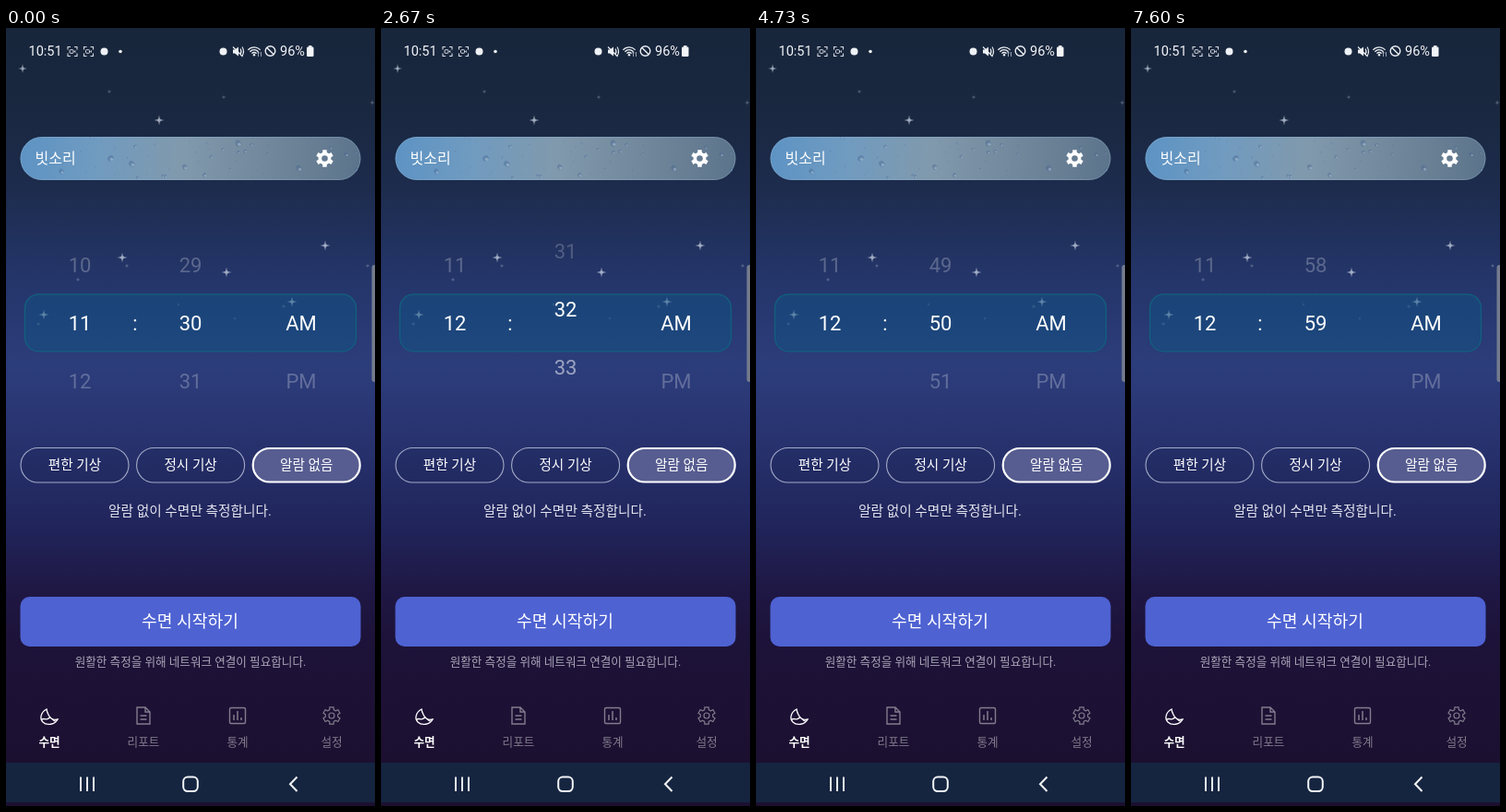
Animation of 400 by 844 pixels, one loop 8 s. Source, as an HTML page with a canvas:

```html
<!DOCTYPE html>
<html lang="ko">
<head>
<meta charset="utf-8">
<title>Alarm picker</title>
<style>
html, body { margin: 0; width: 100%; height: 100%; overflow: hidden; background: #1c1030; }
canvas { display: block; width: 400px; height: 844px; }
</style>
</head>
<body>
<canvas id="stage" width="400" height="844"></canvas>
<script>
const ctx = document.getElementById('stage').getContext('2d');
const LOOP = 8000, STEP = 1000 / 15, ROW = 63, MID = 320;
const FONT = 'Roboto, "Noto Sans CJK KR", "Noto Sans CJK", sans-serif';

const HOUR_KEYS = [[0.33, 11], [0.7, 11.3], [1.05, 11.82], [1.4, 12]];
const MINUTE_KEYS = [[2.07, 30], [2.7, 32.4], [3.4, 36.73], [4.2, 47.6], [4.73, 49.98],
  [5.05, 50.7], [5.6, 53.83], [6.3, 57.6], [6.87, 58.8], [7.6, 59]];

// monotone cubic through [time, value] keys
function track(keys, t) {
  const n = keys.length - 1;
  if (t <= keys[0][0]) return keys[0][1];
  if (t >= keys[n][0]) return keys[n][1];
  let i = 0;
  while (t > keys[i + 1][0]) i++;
  const rise = k => (keys[k + 1][1] - keys[k][1]) / (keys[k + 1][0] - keys[k][0]);
  const slope = k => {
    if (k === 0 || k === n) return 0;
    const a = rise(k - 1), b = rise(k);
    return a * b > 0 ? 2 * a * b / (a + b) : 0;
  };
  const h = keys[i + 1][0] - keys[i][0], u = (t - keys[i][0]) / h, v = 1 - u;
  return keys[i][1] * (1 + 2 * u) * v * v + keys[i + 1][1] * u * u * (3 - 2 * u) +
    h * (slope(i) * u * v * v - slope(i + 1) * u * u * v);
}

function vertical(y0, y1, stops) {
  const g = ctx.createLinearGradient(0, y0, 0, y1);
  for (const [p, c] of stops) g.addColorStop(p, c);
  return g;
}

function box(x, y, w, h, r, fill, stroke, width = 1) {
  ctx.beginPath();
  ctx.roundRect(x, y, w, h, r);
  paint(fill, stroke, width);
}

function paint(fill, stroke, width = 1) {
  if (fill) { ctx.fillStyle = fill; ctx.fill(); }
  if (stroke) { ctx.strokeStyle = stroke; ctx.lineWidth = width; ctx.stroke(); }
}

function path(d, fill, stroke, width, x = 0, y = 0) {
  ctx.save();
  ctx.translate(x, y);
  const p = new Path2D(d);
  if (fill) { ctx.fillStyle = fill; ctx.fill(p, 'evenodd'); }
  if (stroke) { ctx.strokeStyle = stroke; ctx.lineWidth = width; ctx.stroke(p); }
  ctx.restore();
}

function disc(x, y, r, fill, stroke, width) {
  ctx.beginPath();
  ctx.arc(x, y, r, 0, 7);
  paint(fill, stroke, width);
}

function text(s, x, y, size, color = '#fff', weight = 400, align = 'center') {
  ctx.font = `${weight} ${size}px ${FONT}`;
  ctx.textAlign = align;
  ctx.fillStyle = color;
  ctx.fillText(s, x, y);
}

function gear(x, y, outer, inner, hole, fill, stroke) {
  ctx.beginPath();
  for (let k = 0; k < 6; k++) {
    const a = k * Math.PI / 3 - Math.PI / 2;
    for (const [da, r] of [[-0.34, inner], [-0.23, outer], [0.23, outer], [0.34, inner]])
      ctx.lineTo(x + r * Math.cos(a + da), y + r * Math.sin(a + da));
  }
  ctx.closePath();
  ctx.moveTo(x + hole, y);
  ctx.arc(x, y, hole, 0, 2 * Math.PI);
  if (fill) { ctx.fillStyle = fill; ctx.fill('evenodd'); }
  if (stroke) { ctx.strokeStyle = stroke; ctx.lineWidth = 1.2; ctx.stroke(); }
}

const STARS = [[18, 44, 5], [112, 69, 2.5], [166, 100, 5.5], [236, 75, 2.5], [397, 81, 3],
  [126, 249, 5.5], [131, 258, 2.5], [78, 273, 2.5], [239, 265, 5.5], [346, 236, 5.5],
  [392, 258, 2.5], [187, 300, 2], [41, 311, 5.5], [35, 321, 2.5], [310, 297, 5.5],
  [301, 302, 2.5], [248, 315, 2]];

function star(x, y, r) {
  const q = r * 0.17;
  ctx.beginPath();
  for (let k = 0; k < 8; k++) {
    const d = k % 2 ? q * 1.4 : r, a = k * Math.PI / 4;
    ctx.lineTo(x + d * Math.cos(a), y + d * Math.sin(a));
  }
  paint(`rgba(205,212,225,${r > 4 ? 0.68 : 0.42})`);
  if (r > 4) disc(x, y, r * 0.42, 'rgba(200,210,230,.25)');
}

function background() {
  ctx.fillStyle = vertical(0, 797, [[0, '#18263c'], [0.1, '#19273f'], [0.22, '#1d2c4d'],
    [0.34, '#24356a'], [0.46, '#2c3d7b'], [0.51, '#2b3876'], [0.6, '#252e68'],
    [0.68, '#20245a'], [0.76, '#1f1845'], [0.84, '#1d1238'], [1, '#1c1031']]);
  ctx.fillRect(0, 0, 400, 844);
  ctx.fillStyle = '#152540';
  ctx.fillRect(0, 797, 400, 43);
  ctx.fillStyle = '#1c1030';
  ctx.fillRect(0, 840, 400, 4);
  for (const s of STARS) star(...s);
}

function recorder(x, lit) {
  path('M-5-2V-5H-2M2-5H5V-2M5 2V5H2M-2 5H-5V2', null, '#d5dae2', 1.1, x, 25.5);
  if (!lit) return;
  box(x - 3, 23.7, 4, 3.6, 0.8, null, '#d5dae2', 1);
  path('M1.5 0L3.3-1.6V1.6Z', '#d5dae2', null, 0, x, 25.5);
}

function statusBar(t) {
  text('10:51', 24.5, 30, 14.5, '#f2f4f7', 400, 'left');
  recorder(72, t < 3.2 || t > 3.53);
  recorder(89.5, true);
  disc(106.5, 25.5, 4, '#eef1f5');
  disc(124, 25.5, 1.8, '#eef1f5');

  disc(235.5, 25.5, 4, '#eef1f5');
  path('M-5-2H-3L1-5V5L-3 2H-5Z', '#eef1f5', null, 0, 251, 25.5);
  path('M-5-5L5.5 5.5M3-3Q5 0 3 3M5-5Q8 0 5 5', null, '#eef1f5', 1.1, 251, 25.5);
  for (const r of [3.5, 6.3, 9.1]) {
    ctx.beginPath();
    ctx.arc(269, 30, r, -Math.PI * 0.76, -Math.PI * 0.24);
    paint(null, '#eef1f5', 1.3);
  }
  disc(269, 29.3, 1.2, '#eef1f5');
  path('M0-2V3M-1.5-.5L0-2L1.5-.5M3 3V-2', null, '#b9c2cf', 0.8, 273.5, 28);
  disc(286.5, 25, 5.3, null, '#eef1f5', 1.4);
  path('M-3.7-3.7L3.7 3.7', null, '#eef1f5', 1.4, 286.5, 25);
  text('96%', 297, 30, 14.5, '#f2f4f7', 400, 'left');
  box(326, 20.5, 7.5, 10.5, 1.3, '#f2f4f7');
  box(328, 19, 3.5, 2, 0.5, '#f2f4f7');
}

function soundPill() {
  ctx.save();
  ctx.beginPath();
  ctx.roundRect(15.5, 118, 369, 47, 23.5);
  ctx.clip();
  const g = ctx.createLinearGradient(16, 130, 384, 152);
  [[0, '#5d93c4'], [0.22, '#709bc0'], [0.48, '#8199ac'], [0.72, '#72889c'], [1, '#5c748b']]
    .forEach(([p, c]) => g.addColorStop(p, c));
  ctx.fillStyle = g;
  ctx.fillRect(15, 117, 370, 49);
  let seed = 29;
  const rnd = () => (seed = seed * 16807 % 2147483647) / 2147483647;
  for (let i = 0; i < 65; i++) {
    const x = 60 + 325 * rnd(), y = 119 + 45 * rnd(), r = 0.6 + 2.5 * rnd() ** 3;
    ctx.beginPath();
    ctx.ellipse(x, y, r * 1.25, r, rnd() * 3, 0, 7);
    paint('rgba(62,96,143,.36)');
    disc(x + r * 0.4, y + r * 0.4, r * 0.6, 'rgba(205,220,233,.4)');
  }
  ctx.restore();
  box(16, 118.5, 368, 46, 23, null, 'rgba(150,180,210,.35)');
  text('빗소리', 31.5, 147, 16, '#fff', 500, 'left');
  gear(345.5, 141.5, 9.6, 7, 3.3, '#fff');
}

function fade(d) {
  if (d < 24) return 1;
  if (d < 62) return 1 - (d - 24) / 38 * 0.74;
  return Math.max(0.16, 0.26 - (d - 62) * 0.003);
}

function wheel(x, pos, items) {
  items.forEach((label, i) => {
    const dy = (i - pos) * ROW;
    if (Math.abs(dy) < 110)
      text(label, x, MID + dy + 7.8, 22, `rgba(255,255,255,${fade(Math.abs(dy))})`);
  });
}

const range = (a, b) => Array.from({ length: b - a + 1 }, (_, i) => String(a + i).padStart(2, '0'));
const HOURS = range(1, 12), MINUTES = range(0, 59);

function picker(t) {
  box(20.5, 288.8, 359, 62, 15, 'rgba(16,84,132,.48)', '#12607e', 1.3);
  ctx.save();
  ctx.beginPath();
  ctx.rect(20, MID - 1.5 * ROW, 360, 3 * ROW);
  ctx.clip();
  wheel(80, track(HOUR_KEYS, t) - 1, HOURS);
  wheel(200, track(MINUTE_KEYS, t), MINUTES);
  wheel(320, 0, ['AM', 'PM']);
  ctx.restore();
  text(':', 140, 327.5, 22);
  box(396.5, 257, 8, 127, 3, '#737b8d');
}

function controls() {
  ['편한 기상', '정시 기상', '알람 없음'].forEach((label, i) => {
    const x = 16 + i * 125.6, on = i === 2;
    if (on) box(x + 0.5, 456, 116, 36.5, 18.2, '#575d90', '#fff', 2.2);
    else box(x, 455.5, 117, 37.5, 18.7, 'rgba(20,25,70,.12)', 'rgba(225,230,245,.68)', 1.1);
    text(label, x + 58.5, 479, 14.6, '#fff', 500);
  });
  text('알람 없이 수면만 측정합니다.', 199.5, 528.5, 14.7, '#e3e4ee');
  box(15.5, 617, 369, 54, 10, '#4e62d2');
  text('수면 시작하기', 199.5, 650.3, 18.2, '#fff', 500);
  text('원활한 측정을 위해 네트워크 연결이 필요합니다.', 200, 692, 12.6, '#aaa6b8');
}

function tabs() {
  const dim = '#817c8d';
  path('M-3-8C-9-5-11 2-7 6C-3 10 6 9 9 3C5 4 1 2-1-2C-2-4-3-6-3-8ZM-9 4C-6 0-4 5-1 2C2-1 4 6 7 5',
    null, '#fff', 1.3, 47, 747);
  path('M-7-9H2L7-4V9H-7ZM2-9V-4H7M-3.5 0H3.5M-3.5 4H3.5', null, dim, 1.4, 149, 746);
  box(242.5, 737.5, 17, 17, 1.5, null, dim, 1.4);
  path('M-4 5V-1M0 5V-5M4 5V2', null, dim, 1.5, 251, 746);
  gear(353, 746, 9.4, 6.8, 3, null, dim);
  ['수면', '리포트', '통계', '설정'].forEach((s, i) =>
    text(s, 47 + i * 102, 778.5, 12.6, i ? dim : '#fff', i ? 400 : 700));
}

function navBar() {
  path('M81 812.5V828M88 812.5V828M95 812.5V828', null, '#f3f5f8', 1.9);
  box(192.2, 812.5, 15.6, 15.6, 4.8, null, '#f3f5f8', 2);
  path('M315.5 812.5L308 820.2L315.5 828', null, '#f3f5f8', 2);
}

function frame(now) {
  const ms = now % LOOP;
  const t = Math.floor((ms + 5) / STEP) * STEP / 1000;
  background();
  statusBar(t);
  soundPill();
  picker(t);
  controls();
  tabs();
  navBar();
}

const start = performance.now();
function tick() {
  frame(performance.now() - start);
  requestAnimationFrame(tick);
}
tick();
</script>
</body>
</html>
```
